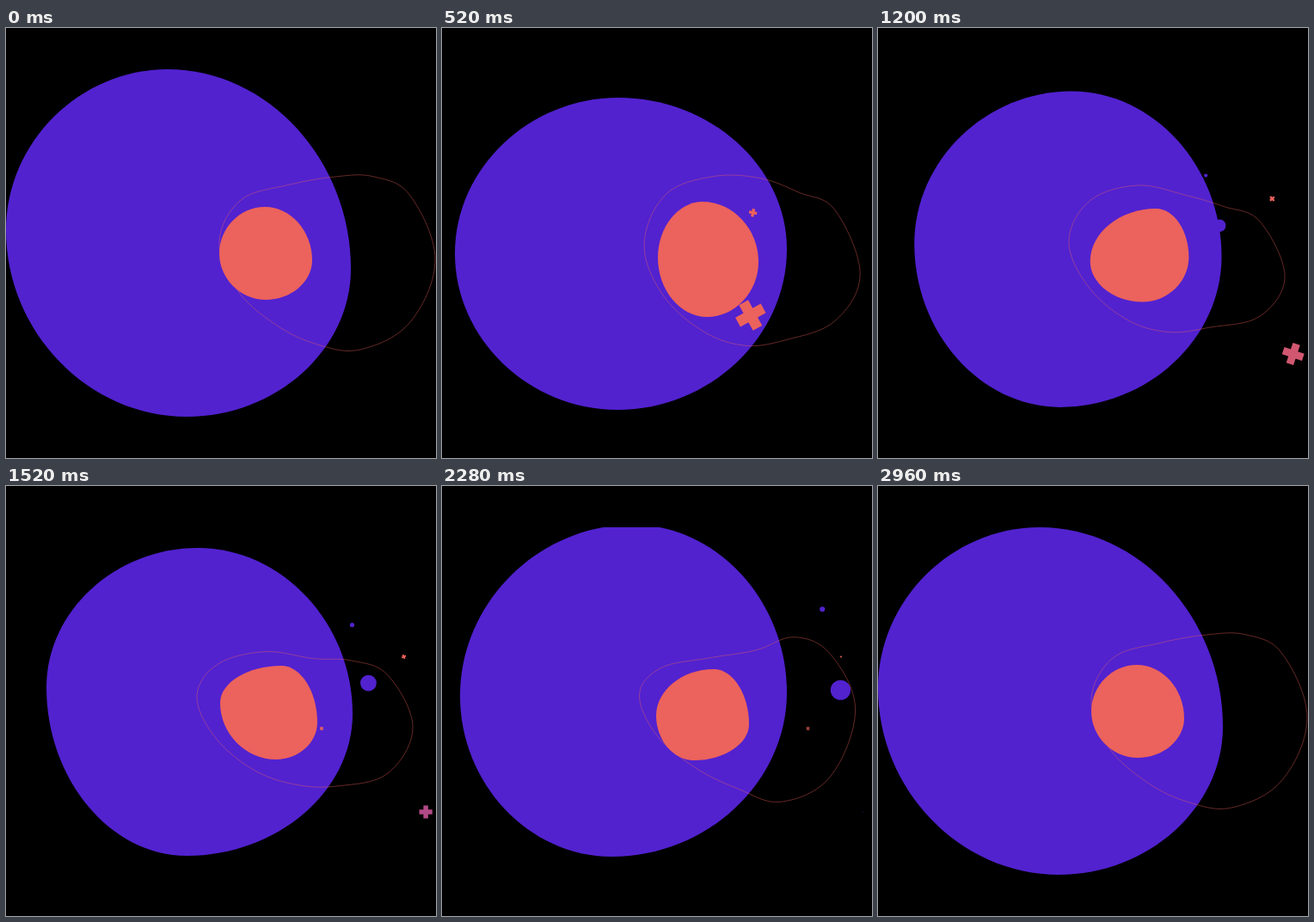
Animation of 500x500 px, one loop 3 s. Source, as an HTML page with a canvas:

```html
<!DOCTYPE html>
<html lang="en">
<head>
<meta charset="utf-8">
<title>Blobs</title>
<style>
html, body { margin: 0; height: 100%; background: #000; overflow: hidden; }
canvas { display: block; width: 500px; height: 500px; }
</style>
</head>
<body>
<canvas id="stage" width="500" height="500"></canvas>
<script>
const ctx = document.getElementById('stage').getContext('2d');
const LOOP = 3000, STEP = 40, PERIOD = 2960;
const PURPLE = [82, 34, 207], CORAL = [236, 98, 92];
const rgba = (c, a = 1) => `rgba(${c.map(Math.round)},${a})`;
const clamp = (v, lo = 0, hi = 1) => Math.max(lo, Math.min(hi, v));
const mix = (a, b, u) => a + (b - a) * u;
const glide = (t, tau) => 1 - Math.exp(-t / tau);

// A blob is its top, right, bottom and left extreme (x, y) at each key time.
const times = [0, 520, 920, 1520, 1880, 2280];
const body = [
  [188,48, 401,280, 210,452, 0,235],
  [205,81, 401,257, 204,444, 15,262],
  [220,75, 397,258, 217,447, 32,267],
  [223,72, 403,265, 210,430, 47,234],
  [208,67, 401,228, 242,419, 36,247],
  [222,45, 401,240, 197,431, 21,244]
];
const core = [
  [301,208, 356,270, 302,316, 248,262],
  [303,202, 368,272, 308,336, 251,267],
  [318,209, 362,258, 302,323, 247,286],
  [320,209, 362,275, 314,318, 249,252],
  [298,208, 361,256, 309,323, 255,263],
  [316,213, 357,277, 293,319, 249,267]
];

// The ring's points bob on one wave: x offset, mean y, amplitude, phase in degrees.
const ring = [
  [0, 246, 4.5, 60], [25, 203, 9.5, 252], [80, 187, 14.5, 252], [135, 186.5, 15, 205],
  [180, 188.5, 19, 145], [222, 208, 17, 140], [251, 275.5, 16, 113], [222, 338, 4, 10],
  [165, 361, 13.5, -20], [115, 358, 12.5, 35], [65, 337.5, 13, 57], [20, 297.5, 10.5, 55]
];

// Smooth cyclic interpolation between the key poses.
function pose(keys, t) {
  const n = times.length;
  const at = i => times[(i + n) % n] + Math.floor(i / n) * PERIOD;
  let i = n - 1;
  while (times[i] > t) i--;
  const [h0, h, h2] = [-1, 0, 1].map(d => at(i + d + 1) - at(i + d));
  const u = (t - at(i)) / h, v = 1 - u;
  return keys[0].map((_, k) => {
    const [o, a, b, c] = [-1, 0, 1, 2].map(d => keys[(i + d + n) % n][k]);
    const d0 = (a - o) / h0, d = (b - a) / h, d2 = (c - b) / h2;
    const m = (d0 * h + d * h0) / (h0 + h), w = (d * h2 + d2 * h) / (h + h2);
    return a * v * v * (1 + 2 * u) + b * u * u * (3 - 2 * u) + h * u * v * (m * v - w * u);
  });
}

// Four quarter ellipses joined at the extremes.
function blob(keys, t, color) {
  const [tx, ty, rx, ry, bx, by, lx, ly] = pose(keys, t), k = .545;
  ctx.beginPath();
  ctx.moveTo(tx, ty);
  ctx.bezierCurveTo(mix(tx, rx, k), ty, rx, mix(ry, ty, k), rx, ry);
  ctx.bezierCurveTo(rx, mix(ry, by, k), mix(bx, rx, k), by, bx, by);
  ctx.bezierCurveTo(mix(bx, lx, k), by, lx, mix(ly, by, k), lx, ly);
  ctx.bezierCurveTo(lx, mix(ly, ty, k), mix(tx, lx, k), ty, tx, ty);
  ctx.fillStyle = rgba(color);
  ctx.fill();
}

function drawRing(t) {
  const w = 2 * Math.PI * t / PERIOD;
  const left = 231.4 + 13 * Math.cos(w) + 3.6 * Math.cos(2 * w);
  const pts = ring.map(([x, y, amp, phase]) =>
    [left + x, y + amp * Math.cos(w - phase * Math.PI / 180)]);
  const n = pts.length, p = i => pts[(i + n) % n];
  const handle = (i, s) => [0, 1].map(k => p(i)[k] + s * (p(i + 1)[k] - p(i - 1)[k]) / 5.7);
  ctx.beginPath();
  ctx.moveTo(...pts[0]);
  pts.forEach((_, i) => ctx.bezierCurveTo(...handle(i, 1), ...handle(i + 1, -1), ...p(i + 1)));
  ctx.strokeStyle = rgba(CORAL, .42);
  ctx.lineWidth = 1;
  ctx.stroke();
}

function dot(x, y, r, alpha) {
  ctx.beginPath();
  ctx.arc(x, y, r, 0, 7);
  ctx.fillStyle = rgba(PURPLE, alpha);
  ctx.fill();
}

function cross(x, y, size, deg, alpha = 1, tint = 0) {
  const w = size * .36;
  ctx.save();
  ctx.translate(x, y);
  ctx.rotate(deg * Math.PI / 180);
  ctx.beginPath();
  ctx.rect(-size / 2, -w / 2, size, w);
  ctx.rect(-w / 2, -size / 2, w, size);
  ctx.fillStyle = rgba(CORAL.map((c, i) => mix(c, PURPLE[i], tint)), alpha);
  ctx.fill();
  ctx.restore();
}

function drawDots(t) {
  if (t < 700) return;
  const fade = clamp((2800 - t) / 450), drift = 190 * glide(t - 700, 2200);
  dot(345 + drift * 1.02 + 20 * glide(t - 700, 500), 229 + 1.2e-5 * (t - 1450) ** 2,
    12.5 * glide(t - 650, 620), fade);
  dot(341 + drift * 1.04, 190 - drift * .48, 3.1 * glide(t - 700, 450), fade);
}

function drawCrosses(t) {
  const age = t - 405;
  if (age < 0) return;
  const fade = clamp((2700 - t) / 400), out = glide(age, 235), settle = glide(age, 100);
  cross(mix(276, 490, out), mix(237, 379, settle), Math.max(1.6, 34 * (1 - (age / 1500) ** 2)),
    Math.max(0, 94 - t * .063), fade * clamp((2000 - t) / 300, .4), clamp((t - 920) / 1600));
  cross(mix(297, 464, out), mix(250, 198.5, settle), 11.2 - t * .0038, t * .053 - 16, fade);
  if (t > 800) cross(367 + .077 * (t - 1520), 282, 4.5, 45, clamp((2680 - t) / 570));
}

function draw(t) {
  ctx.clearRect(0, 0, 500, 500);
  ctx.save();
  ctx.beginPath();
  ctx.rect(0, 48, 500, 404);
  ctx.clip();
  blob(body, t, PURPLE);
  drawDots(t);
  blob(core, t, CORAL);
  drawRing(t);
  drawCrosses(t);
  ctx.restore();
}

const start = performance.now();
function tick() {
  const t = (performance.now() - start) % LOOP;
  draw(Math.floor(t / STEP) * STEP);
  requestAnimationFrame(tick);
}
tick();
</script>
</body>
</html>
```
